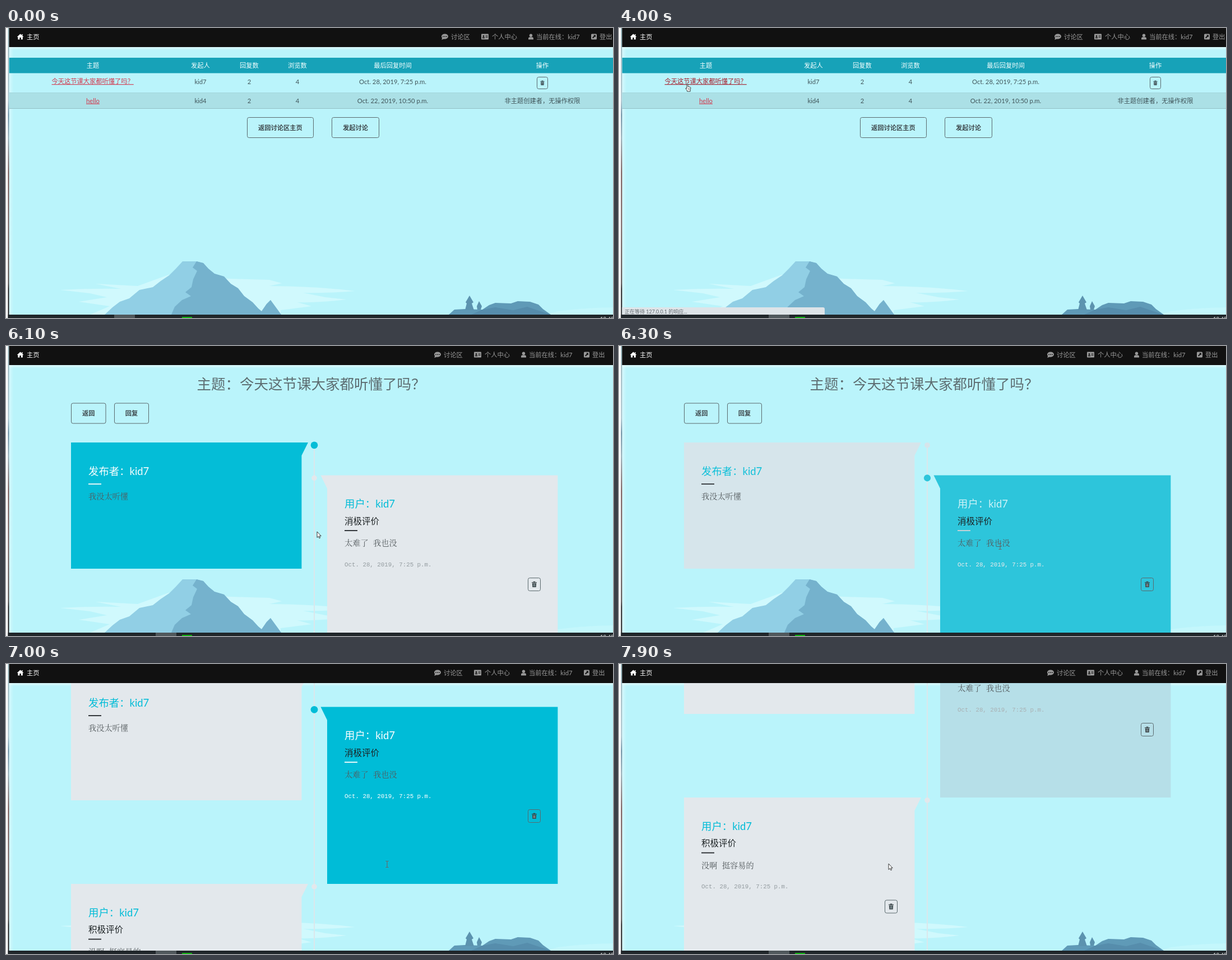
Recreate the animation shown at these times as an HTML page. Size 1083 by 517 pixels, loop 8 s.

```html
<!DOCTYPE html>
<html lang="zh">
<head>
<meta charset="utf-8">
<title>讨论区</title>
<style>
  html, body { margin: 0; width: 100%; height: 100%; overflow: hidden; background: #fff; }
  svg { display: block; width: 100%; height: 100%; }
  text { font-family: Lato, "Noto Sans CJK SC", "Noto Sans CJK", sans-serif; font-weight: 400; white-space: pre; }
  .bold { font-weight: 700; }
  .mono { font-family: "Liberation Mono", "Noto Serif CJK SC", "Noto Sans CJK SC", monospace; }
  .mid { text-anchor: middle; }
</style>
</head>
<body>
<svg id="stage" viewBox="0 0 1083 517" preserveAspectRatio="none"></svg>
<script>
const LOOP = 8000, STEP = 100;
const ME = "kid7", OTHER = "kid4";
const DATE = "Oct. 28, 2019, 7:25 p.m.";
const GREY = [227, 232, 236], CYAN = [0, 188, 215], WHITE = [255, 255, 255], INK = [34, 38, 42], FADED = [148, 156, 160];

// y is the visual middle of the line
const label = (x, y, size, fill, str, cls = "", extra = "") =>
  `<text x="${x}" y="${y + size * 0.37}" font-size="${size}" fill="${fill}" class="${cls}" ${extra}>${str}</text>`;
const rect = (x, y, w, h, fill, extra = "") =>
  `<rect x="${x}" y="${y}" width="${w}" height="${h}" fill="${fill}" ${extra}/>`;
const shape = (d, fill, extra = "") => `<path d="${d}" fill="${fill}" ${extra}/>`;
const at = (x, y, body) => `<g transform="translate(${x} ${y})">${body}</g>`;
const outline = (x, y, w, h) => rect(x + 0.5, y + 0.5, w - 1, h - 1, "none", 'stroke="#5a696d" rx="3"');
const button = (x, y, w, str) => outline(x, y, w, 37) + label(x + w / 2, y + 18.8, 11.25, "#3f4a4e", str, "bold mid");

const icons = {
  home: c => shape("M5.5 0L11.5 5.5H9.8V10H6.8V6.6H4.3V10H1.3V5.5H-.4ZM8.2 .6H9.6V3H8.2Z", c),
  chat: c => `<ellipse cx="6" cy="4.6" rx="6" ry="4.6" fill="${c}"/>` + shape("M1.5 6L.3 10.4L5.5 8.5Z", c) +
    [3, 6, 9].map(x => `<circle cx="${x}" cy="4.7" r=".9" fill="#111"/>`).join(""),
  card: c => rect(0, 0, 13, 10, c, 'rx="1"') + `<circle cx="4" cy="4" r="1.4" fill="#111"/>` +
    rect(1.8, 6, 4.4, 1.8, "#111", 'rx=".8"') + rect(7.6, 3, 4, 1, "#111") + rect(7.6, 5.4, 4, 1, "#111"),
  user: c => `<circle cx="4.5" cy="2.8" r="2.7" fill="${c}"/>` + shape("M0 10V8.5Q0 5.8 2.5 5.8H6.5Q9 5.8 9 8.5V10Z", c),
  exit: c => rect(0, 0, 10, 10, c, 'rx="1.5"') + shape("M4 2H8V6L6.7 4.7L3.4 8L2 6.6L5.3 3.3Z", "#111"),
  bin: c => shape("M-4.5 -4H-1.8V-5.2H1.8V-4H4.5V-2.8H-4.5ZM-3.7 -2H3.7L3.2 5H-3.2Z", c) +
    [-1.5, 0, 1.5].map(x => rect(x - 0.25, -1, 0.5, 4.8, "#cfe4e8")).join("")
};

function scenery() {
  const pale = "#d0f9fd";
  const slope = "L352 419L361 429L372 438L389 443L401 456L414 464L425 478L440 489L450 500L456 505L465 492L472 485L480 496L491 511";
  return rect(5.5, 34, 1078, 477, "#baf4fb") +
    rect(5.5, 34, 1078, 6, "url(#glowDown)") + rect(5.5, 34, 8, 477, "url(#glowRight)") +
    shape("M97 467Q150 464 205 465L160 456L235 460L290 440L400 447L470 449L492 455L470 460Q560 461 622 469Q570 473 530 472L570 480L607 484Q560 490 520 489L545 496L490 503V511H150L185 496L130 488L180 480L150 473Z", pale) +
    shape(`M176 511L190 498L203 488L220 482L238 467L262 462L276 451L291 441L304 428L315 416L340 416${slope}Z`, "#91cfe5") +
    shape(`M340 416${slope}H295L301 497L314 485L330 478L320 471L331 462L334 448L341 433L333 427Z`, "#75b2cd") +
    shape("M1083 498Q1030 499 985 505L960 511H1083Z", "#c4f7fc") +
    shape("M790 511L800 502L818 501L850 502L862 494L873 490L901 491L913 487L935 488L950 493L958 501L972 511Z", "#5f9ab7") +
    shape("M850 502L873 498L905 503L930 497L972 511H830Z", "#568dac") +
    shape("M827 477L834 489L831 491L835 503H819L822 491L820 489ZM844 487L849 496L847 502H841L840 496Z", "#5c93af");
}

function topics() {
  const cols = [155, 347, 434, 520, 690, 957];
  const row = (y, color, cells) => cells.map((s, i) => s && label(cols[i], y, 11.25, color, s, "mid")).join("");
  const link = (id, x, y, s, anchor) =>
    label(x, y, 11.25, "#d23a4f", s, anchor, `id="${id}" text-decoration="underline"`);
  return rect(5.5, 53, 1078, 27.5, "#17a2b8") +
    row(66.5, "#f4ffff", ["主题", "发起人", "回复数", "浏览数", "最后回复时间", "操作"]) +
    rect(5.5, 115, 1078, 28.5, "#abe0e6") + rect(5.5, 115, 1078, 0.7, "#a2d3d9") + rect(5.5, 143, 1078, 1, "#93bfc5") +
    row(95.5, "#41565b", ["", ME, "2", "4", DATE, ""]) +
    row(129.5, "#41565b", ["", OTHER, "2", "4", "Oct. 22, 2019, 10:50 p.m.", "非主题创建者，无操作权限"]) +
    link("topic", 81.5, 95, "今天这节课大家都听懂了吗？", "") + link("hello", 155, 129.5, "hello", "mid") +
    outline(947, 87, 20, 22) + at(957, 98, `<g transform="scale(.8)">${icons.bin("#33474c")}</g>`) +
    button(430, 159, 119, "返回讨论区主页") + button(581, 159, 85, "发起讨论");
}

const cards = [
  { x: 116, y: 172, h: 225, left: true, head: "发布者：", body: "我没太听懂" },
  { x: 573, y: 230.5, h: 315.5, left: false, head: "用户：", mood: "消极评价", body: "太难了 我也没" },
  { x: 116, y: 546, h: 315, left: true, head: "用户：", mood: "积极评价", body: "没啊 挺容易的" }
];

function cardMarkup(c, i) {
  const tx = c.x + 31, low = c.mood ? 24.5 : 0;
  const tip = c.left ? `M${c.x + 411} ${c.y}h12l-12 24Z` : `M${c.x} ${c.y}h-11.5l11.5 23.5Z`;
  return `<g id="card${i}"><g class="fill">` +
    shape(`M${c.x} ${c.y}h411.4v${c.h}h-411.4Z${tip}`, "inherit") +
    `<circle cx="550" cy="${c.y + 4.8}" r="5" fill="inherit"/></g>` +
    label(tx, c.y + 51, 18.4, "", c.head + ME, "head") +
    (c.mood ? label(tx, c.y + 81.5, 15.5, "#1c2224", c.mood) : "") +
    rect(tx, c.y + 73.2 + low, 23, 1.8, "", 'class="dash"') +
    label(tx, c.y + 96 + low, 14.2, "#535a5d", c.body, "mono") +
    (c.mood ? label(tx, c.y + 158.5, 10.8, "", DATE, "mono date") +
      outline(c.x + 358, c.y + 182.5, 23, 24) + at(c.x + 369.5, c.y + 194.5, icons.bin("#3a4448")) : "") + "</g>";
}

const thread = () =>
  label(340.5, 68, 25.5, "#5d6d71", "主题：今天这节课大家都听懂了吗？") +
  button(116, 101.5, 62.5, "返回") + button(193, 101.5, 62, "回复") +
  rect(549, 177, 2, 700, "#dbe7eb") + cards.map(cardMarkup).join("");

function navBar() {
  const grey = "#999";
  const item = (icon, ix, tx, s) => at(ix, 10.5, icons[icon](grey)) + label(tx, 15.8, 11.25, grey, s);
  return rect(5.5, 0, 1078, 34, "#111") + at(20, 10.5, icons.home("#fff")) + label(37, 15.8, 11.25, "#fff", "主页") +
    `<g id="menu">` + item("chat", 777, 794, "讨论区") + item("card", 848, 867, "个人中心") +
    item("user", 932, 946, "当前在线：" + ME) + item("exit", 1044, 1059, "登出") + "</g>";
}

const pointers = {
  arrow: shape("M0 0V10.5L2.4 8.3L4 11.8L5.6 11L4.1 7.7H7.2Z", "#fff", 'stroke="#222" stroke-width=".9"'),
  hand: shape("M-1 0Q0 -1 1 0V4.5L4.5 5.2Q6 5.6 5.9 7L5.2 10.5V13H-.5V11.5L-3 8Q-3.4 6.4 -1 7.6Z", "#fff", 'stroke="#222" stroke-width=".9"') +
    rect(1.2, 7, 0.7, 3.5, "#444") + rect(3, 7, 0.7, 3.5, "#444"),
  beam: shape("M-2.5 -5.5H-.5L0 -5L.5 -5.5H2.5M0 -5V5M-2.5 5.5H-.5L0 5L.5 5.5H2.5", "none", 'stroke="#75605c"')
};

const stage = document.getElementById("stage");
stage.innerHTML = `<defs>
  <clipPath id="view"><rect x="5.5" y="34" width="1078" height="477"/></clipPath>
  <linearGradient id="glowDown" x2="0" y2="1"><stop stop-color="#fff" stop-opacity=".5"/><stop offset="1" stop-color="#fff" stop-opacity="0"/></linearGradient>
  <linearGradient id="glowRight"><stop stop-color="#fff" stop-opacity=".4"/><stop offset="1" stop-color="#fff" stop-opacity="0"/></linearGradient>
  <linearGradient id="desk" x2="0" y2="1">
    <stop stop-color="#8fb0b8"/><stop offset=".25" stop-color="#a5c0ca"/><stop offset=".3" stop-color="#5f869c"/>
    <stop offset=".38" stop-color="#8fa8b2"/><stop offset=".5" stop-color="#6c4b4a"/><stop offset=".68" stop-color="#6e5756"/>
    <stop offset=".88" stop-color="#4a4443"/><stop offset=".9" stop-color="#1a1c1e"/></linearGradient></defs>` +
  rect(0, 0, 1083, 517, "#fff") + rect(3.5, 0, 2.2, 517, "url(#desk)") +
  `<g clip-path="url(#view)">${scenery()}<g id="topics">${topics()}</g><g id="thread">${thread()}</g></g>` +
  navBar() +
  `<g id="status"><path id="bubble" fill="#dee4e8"/>${label(10, 506, 9, "#62696e", "", "", 'id="message"')}</g>` +
  rect(3.5, 511, 1080, 6, "#20262a") + rect(0, 511, 37, 6, "#50585c", 'id="task"') +
  rect(314, 515.2, 18, 1.8, "#10c410") + label(1060, 518.5, 9.5, "#e8eaea", "18:45") +
  Object.entries(pointers).map(([k, v]) => `<g id="${k}">${v}</g>`).join("");

const $ = id => document.getElementById(id);
const show = (id, on) => $(id).setAttribute("display", on ? "inline" : "none");
const clamp = v => Math.min(1, Math.max(0, v));
const mix = (a, b, k) => `rgb(${a.map((v, i) => Math.round(v + (b[i] - v) * k))})`;

// CSS "ease" timing curve
function ease(p) {
  p = clamp(p);
  let lo = 0, hi = 1, s = p;
  for (let i = 0; i < 20; i++) {
    s = (lo + hi) / 2;
    const x = 0.75 * s * (1 - s) + s ** 3;
    if (x < p) lo = s; else hi = s;
  }
  return 0.3 * s * (1 - s) ** 2 + 3 * s * s * (1 - s) + s ** 3;
}

function track(t, keys) {
  const i = keys.findIndex(k => k[0] > t);
  if (i === 0) return keys[0].slice(1);
  if (i < 0) return keys[keys.length - 1].slice(1);
  const a = keys[i - 1], b = keys[i], p = (t - a[0]) / (b[0] - a[0]);
  return a.slice(1).map((v, n) => v + (b[n + 1] - v) * p);
}

const mousePath = [
  [800, 1053, 221], [900, 960, 290], [1000, 815, 360], [1100, 703, 400], [1200, 703, 400],
  [1300, 640, 407], [1500, 400, 360], [1700, 130, 255], [1800, 79, 234], [2000, 79, 234],
  [2300, 105, 165], [2500, 118, 113], [2700, 121, 102], [2800, 122, 100],
  [4700, 122, 100], [4900, 150, 180], [5300, 350, 300], [5600, 350, 300],
  [5900, 450, 322], [6100, 555, 331], [6300, 680, 357], [7100, 680, 357], [7200, 680, 351],
  [7300, 680, 340], [7400, 680, 340], [7500, 650, 343], [7600, 550, 351], [7700, 481, 356]
];
const scrollPath = [[6700, 0], [6800, 40], [6900, 120], [7000, 154], [7700, 154], [7800, 250], [7900, 308]];
const hoverSpan = [[4880, 6090], [6150, 7750], [LOOP, LOOP]];

function drawStatus(t) {
  const waiting = t >= 4000, w = waiting ? 367 : 173;
  show("status", t >= 3000 && t < 4800);
  $("status").setAttribute("opacity", t < 4700 ? 1 : 0.5);
  $("bubble").setAttribute("d", `M5.5 498H${w - 3}q3 0 3 3V511H5.5Z`);
  $("message").textContent = waiting ? "正在等待 127.0.0.1 的响应..." : "127.0.0.1:8000/forum/topic/detail/7";
}

function drawCard(i, t) {
  const [on, off] = hoverSpan[i];
  const k = ease((t - on) / 300) - ease((t - off) / 300);
  const g = $("card" + i), paint = (cls, v) => g.querySelector(cls)?.setAttribute("fill", v);
  paint(".fill", mix(GREY, CYAN, k));
  paint(".head", mix(CYAN, WHITE, k));
  paint(".dash", mix(INK, WHITE, k));
  paint(".date", mix(FADED, WHITE, k));
  g.querySelector("circle").setAttribute("r", 4.8 + 1.6 * k);
}

function drawPointer(t) {
  const kind = t < 800 ? "" : t >= 2700 && t <= 4700 ? "hand" : t >= 6300 && t < 7200 ? "beam" : "arrow";
  const [x, y] = track(t, mousePath);
  for (const k in pointers) {
    show(k, k === kind);
    $(k).setAttribute("transform", `translate(${x} ${y})`);
  }
}

function draw(t) {
  const opened = t >= 4300;
  show("topics", !opened);
  show("thread", opened);
  $("menu").setAttribute("transform", `translate(${opened ? -13 : 0} 0)`);
  $("thread").setAttribute("transform", `translate(0 ${-track(t, scrollPath)[0]})`);
  $("topic").setAttribute("fill", t >= 2700 ? "#a71d2a" : "#d23a4f");
  $("task").setAttribute("x", t >= 3500 ? 267 : 193);
  cards.forEach((_, i) => drawCard(i, t));
  drawStatus(t);
  drawPointer(t);
}

const start = performance.now();
function tick() {
  const t = (performance.now() - start) % LOOP;
  draw(Math.floor(t / STEP) * STEP);
  requestAnimationFrame(tick);
}
tick();
</script>
</body>
</html>
```
